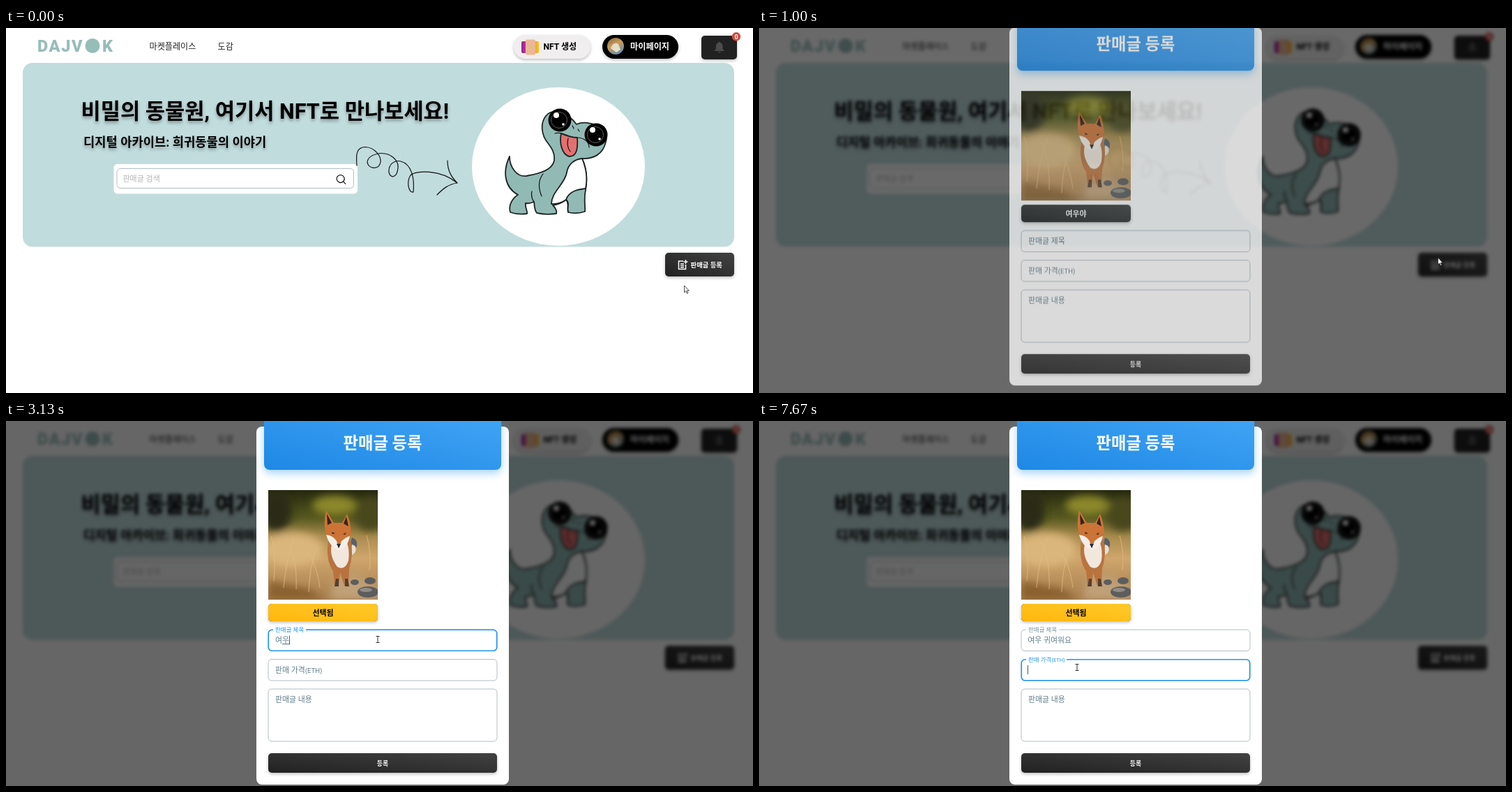
Write an HTML page that moves like this. It is 1071 px wide and 523 px high and loops after 8 s.

```html
<!DOCTYPE html>
<html lang="ko">
<head>
<meta charset="utf-8">
<title>판매글 등록</title>
<style>
html, body { margin: 0; width: 100%; height: 100%; overflow: hidden; background: #fff; }
svg, .overlay { position: absolute; left: 0; top: 0; width: 1071px; height: 523px; }
text { font-family: Roboto, "Noto Sans CJK KR", "Noto Sans CJK", sans-serif; white-space: pre; }
.bold { font-weight: 700; }
.mid { text-anchor: middle; }
.heading { font-weight: 700; filter: drop-shadow(0 3px 2px rgba(0,0,0,.32)); }
.raised { filter: drop-shadow(0 2px 2px rgba(0,0,0,.25)); }
.line { fill: none; stroke: #111; stroke-width: 1.2; stroke-linecap: round; stroke-linejoin: round; }
.ink { stroke: #1c2423; stroke-width: 1.8; stroke-linejoin: round; }
.field { fill: #fff; stroke: #b0bec5; stroke-width: 1; }
.body { font-size: 10.9px; fill: #607d8b; }

.overlay, .dialog, .cursor, .cursor g, .ripple, .picked, .ring, .gap, .label {
  animation: 8s linear infinite;
}
.overlay { background: rgba(0,0,0,.6); backdrop-filter: blur(2.9px); animation-name: fade; }
.dialog { animation-name: drop; }
.ripple { fill: #fff; animation-name: ripple; }
.picked { animation-name: pick; }
.ring { fill: none; stroke: #2196f3; stroke-width: 1.6; }
.gap { fill: #fff; }
.ring.a { animation-name: ring-a; }
.ring.b { animation-name: ring-b; }
.gap.a { animation-name: gap-a; }
.gap.b { animation-name: ring-b; }
.label.a { animation-name: label-a; }
.label.b { animation-name: label-b; }
.cursor { width: 1px; height: 1px; overflow: visible; animation-name: move; }
.cursor .arrow { animation-name: arrow; animation-timing-function: step-end; }
.cursor .beam { animation-name: beam; animation-timing-function: step-end; }

@keyframes fade {
  0%, 10.25% { opacity: 0; animation-timing-function: ease-in-out; }
  12.75%, 100% { opacity: 1; }
}
@keyframes drop {
  0%, 10.375% { opacity: 0; transform: translateY(-36px); animation-timing-function: ease-in-out; }
  13.625%, 100% { opacity: 1; transform: none; }
}
@keyframes ripple {
  0%, 9% { r: 0; opacity: .3; }
  13%, 100% { r: 95px; opacity: 0; }
}
@keyframes pick { 0%, 22.4% { opacity: 0; } 22.5%, 100% { opacity: 1; } }
@keyframes ring-a { 0%, 26.9% { opacity: 0; } 28.9%, 93.8% { opacity: 1; } 95.6%, 100% { opacity: 0; } }
@keyframes ring-b { 0%, 93.8% { opacity: 0; } 95.6%, 100% { opacity: 1; } }
@keyframes gap-a { 0%, 26.9% { opacity: 0; } 28.9%, 100% { opacity: 1; } }
@keyframes label-a {
  0%, 26.9% { transform: translate(386px, 314px); fill: #607d8b; animation-timing-function: ease-out; }
  28.9%, 93.8% { transform: translate(386px, 298.8px) scale(.78); fill: #2196f3; }
  95.6%, 100% { transform: translate(386px, 298.8px) scale(.78); fill: #78909c; }
}
@keyframes label-b {
  0%, 93.8% { transform: translate(386px, 356.5px); fill: #607d8b; animation-timing-function: ease-out; }
  95.6%, 100% { transform: translate(386px, 341.5px) scale(.78); fill: #2196f3; }
}
@keyframes move {
  0%, 5% { transform: translate(972px, 369px); }
  9%, 13.2% { transform: translate(973px, 329px); }
  15% { transform: translate(838px, 205px); }
  15.9% { transform: translate(735px, 132px); }
  16.7% { transform: translate(650px, 105px); }
  17.5% { transform: translate(590px, 150px); }
  18.4% { transform: translate(550px, 225px); }
  19.1% { transform: translate(532px, 272px); }
  20.5%, 24.4% { transform: translate(508px, 270px); }
  25.9%, 87.2% { transform: translate(533px, 313px); }
  93.4%, 100% { transform: translate(456px, 353px); }
}
@keyframes arrow { 0% { opacity: 1; } 25.5% { opacity: 0; } 89.9% { opacity: 1; } 91.6%, 100% { opacity: 0; } }
@keyframes beam { 0% { opacity: 0; } 25.5% { opacity: 1; } 89.9% { opacity: 0; } 91.6%, 100% { opacity: 1; } }
</style>
</head>
<body>

<svg class="page" viewBox="0 0 1071 523">
  <defs>
    <linearGradient id="dark" x1="0" y1="1" x2="1" y2="0"><stop stop-color="#212121"/><stop offset="1" stop-color="#424242"/></linearGradient>
    <linearGradient id="blue" x1="0" y1="1" x2="1" y2="0"><stop stop-color="#1e88e5"/><stop offset="1" stop-color="#42a5f5"/></linearGradient>
    <linearGradient id="amber" x1="0" y1="1" x2="1" y2="0"><stop stop-color="#ffb70e"/><stop offset="1" stop-color="#ffc928"/></linearGradient>
    <linearGradient id="cards"><stop stop-color="#8a1fa8"/><stop offset=".3" stop-color="#d43a86"/><stop offset=".7" stop-color="#f0913c"/><stop offset="1" stop-color="#f6c81f"/></linearGradient>
    <linearGradient id="avatar" x2=".5" y2="1"><stop stop-color="#7d6a45"/><stop offset=".5" stop-color="#c89a58"/><stop offset="1" stop-color="#6d91a5"/></linearGradient>
    <linearGradient id="meadow" x2="0" y2="1">
      <stop stop-color="#25280f"/><stop offset=".25" stop-color="#56581f"/><stop offset=".42" stop-color="#a98b4d"/>
      <stop offset=".62" stop-color="#cfa66c"/><stop offset="1" stop-color="#a67d4e"/>
    </linearGradient>
    <filter id="soft" x="-50%" y="-50%" width="200%" height="200%"><feGaussianBlur stdDeviation="6"/></filter>
    <filter id="smooth"><feGaussianBlur stdDeviation=".7"/></filter>
    <clipPath id="buttonBox"><rect x="945" y="322" width="99" height="34" rx="5"/></clipPath>
    <clipPath id="photoBox"><rect width="157" height="157"/></clipPath>
  </defs>

  <!-- navigation -->
  <g fill="#97bdb9" font-size="23.5" font-weight="900" letter-spacing="1.6">
    <text x="45" y="34">DAJV</text><circle cx="124" cy="25.5" r="10.5"/><text x="138" y="34">K</text>
  </g>
  <g font-size="12.1" font-weight="500" fill="#212121">
    <text x="205.5" y="31">마켓플레이스</text><text x="303.5" y="31">도감</text>
  </g>
  <rect class="raised" x="728" y="10" width="110" height="34" rx="17" fill="#f0eeee"/>
  <rect x="739" y="19" width="25" height="17" rx="2" fill="url(#cards)"/>
  <rect x="745" y="16.500" width="14" height="22" rx="2" fill="#ecb795"/>
  <text class="bold" x="770.5" y="31" font-size="12.1">NFT 생성</text>
  <rect class="raised" x="855" y="10" width="109" height="34" rx="17"/>
  <circle cx="874" cy="26" r="12" fill="url(#avatar)"/>
  <path d="M867 29q4-10 11-6l3 8-6 4z" fill="#e7dcc6"/>
  <text class="bold" x="895" y="31" font-size="12.2" fill="#fff">마이페이지</text>
  <rect class="raised" x="997" y="11" width="51" height="34" rx="5" fill="#212121"/>
  <path d="M1016 33v-1l2-2v-4q0-4 3.500-5v-1h2.500v1q3.500 1 3.500 5v4l2 2v1zm5 1h4q-2 3-4 0z" fill="#4c4c4c"/>
  <circle cx="1047" cy="12.300" r="6.200" fill="#d24a3e"/>
  <text class="mid bold" x="1047" y="15.500" font-size="9" fill="#fff">0</text>

  <!-- hero -->
  <rect x="24" y="50" width="1020" height="263.500" rx="14" fill="#c1dcdd"/>
  <text class="heading" x="107.5" y="129.5" font-size="30.7">비밀의 동물원, 여기서 NFT로 만나보세요!</text>
  <text class="heading" x="111" y="170" font-size="17.700">디지털 아카이브: 희귀동물의 이야기</text>
  <rect x="154.500" y="195" width="349.500" height="42.500" rx="5" fill="#fff"/>
  <rect class="field" x="159" y="201.500" width="339.500" height="28" rx="5"/>
  <text x="167.5" y="220" font-size="11" fill="#b4b4b4">판매글 검색</text>
  <path class="line" d="M483.500 220a5.500 5.500 0 1 1 .1-.1l3 3.500"/>
  <path class="line" d="M503 197C502 184 501 171 515 170.500C529 171 538 184 537 192C535 203 521 203 518 193C518 184 527 181 537 179.500C552 179 563 190 562 200C561 214 552 217 549 207C548 194 558 189 566 191C581 195 586 214 584 235C577 237 574 220 580 211C588 204 622 202 647 222M633 190C633 204 638 213 647 222C634 224 627 230 618 239"/>
  <ellipse cx="792" cy="198.500" rx="124" ry="113.500" fill="#fff"/>

  <!-- lizard -->
  <path class="ink" fill="#92bab5" d="M722 184C722 200 733 214 746 212C768 208 783 203 786 190C787 179 783 173 777 165C767 153 766 136 774 126C785 113 806 122 818 138C836 130 866 144 860 163C856 181 842 188 826 187C832 200 834 215 831 232C828 246 831 256 830 263Q818 267 806 264C804 258 808 251 803 246Q794 253 784 254C788 258 790 262 789 266Q774 268 761 265C757 260 758 254 757 249Q750 252 745 251C744 258 748 262 747 266Q734 268 723 264C720 254 726 244 734 239C714 228 712 205 722 184Z"/>
  <path class="ink" fill="#fff" d="M826 187C832 202 834 214 831 230C822 231 807 233 803 246Q793 253 782 252C782 235 801 224 804 207C806 195 815 188 826 187Z"/>
  <path class="line" d="M770 209Q760 222 768 241M757 249Q752 242 754 234M806 264C804 255 809 250 803 246M787 151C799 148 806 157 818 157C830 157 836 164 836 171M812 140l2 4M820 145l2 3"/>
  <path class="ink" fill="#e37071" d="M796 151C793 164 797 182 808 184C819 184 820 171 819 157Q808 157 796 151Z"/>
  <path class="line" d="M806 158Q803 169 809 177"/>
  <g id="eye">
    <circle cx="794" cy="132" r="16.500"/>
    <circle cx="793" cy="132" r="11.500" fill="none" stroke="#777" stroke-width=".8"/>
    <circle cx="789" cy="125" r="4" fill="#fff"/><circle cx="799" cy="138" r="1.800" fill="#fff"/>
  </g>
  <use href="#eye" x="52" y="21"/>

  <rect class="raised" x="945" y="322" width="99" height="34" rx="5" fill="url(#dark)"/>
  <g fill="none" stroke="#fff" stroke-width="1.500">
    <path d="M971 334h-6.500v11.500h10v-6.500M967 338h5M967 340.500h5M967 343h5M974.500 332v6M971.500 335h6"/>
  </g>
  <text class="bold" x="981.5" y="342.500" font-size="9.400" fill="#fff">판매글 등록</text>
  <g clip-path="url(#buttonBox)"><circle class="ripple" cx="973" cy="333"/></g>
</svg>

<div class="overlay">
  <svg class="dialog" viewBox="0 0 1071 523">
    <rect x="359" y="8" width="362" height="513" rx="8" fill="#fff"/>
    <rect x="370" y="-9" width="340" height="79" rx="8" fill="url(#blue)" style="filter:drop-shadow(0 5px 6px rgba(33,150,243,.4))"/>
    <text class="mid bold" x="540" y="39.500" font-size="23.300" fill="#fff">판매글 등록</text>

    <!-- photo -->
    <g transform="translate(376 99)" clip-path="url(#photoBox)">
      <rect width="157" height="157" fill="url(#meadow)"/>
      <g filter="url(#soft)">
        <ellipse cx="95" cy="22" rx="32" ry="14" fill="#8b8729"/>
        <ellipse cx="12" cy="30" rx="22" ry="30" fill="#292b13"/>
        <ellipse cx="146" cy="35" rx="24" ry="24" fill="#48471c"/>
        <ellipse cx="35" cy="85" rx="45" ry="24" fill="#dab57b"/>
        <path d="M88 157L96 122H126L157 140V157Z" fill="#c0a078"/>
        <path d="M0 130L60 142L80 157H0Z" fill="#89602f"/>
      </g>
      <g stroke="#e2bd82" stroke-width="1.200" opacity=".65" fill="none">
        <path d="M8 130Q12 90 4 66M22 140Q25 100 38 68M40 142Q42 105 30 76M58 146Q59 110 70 80M74 140Q70 108 56 88M145 115Q148 90 141 65"/>
      </g>
      <g filter="url(#smooth)">
        <path d="M120 68Q132 72 124 88L112 96Z" fill="#56616a"/>
        <path d="M120 78Q129 80 124 90L114 98Z" fill="#e9dfd3"/>
        <path d="M86 74Q82 100 93 116L95 137H101L103 118L109 137H115L116 112Q123 92 118 70Z" fill="#b9733f"/>
        <path d="M91 78Q87 94 99 110Q110 116 115 101Q117 86 113 76Z" fill="#f1e7dc"/>
        <path d="M83 29Q79 46 82 60Q90 78 101 84Q112 80 119 62Q118 45 113 34L106 47H94Z" fill="#cc7437"/>
        <path d="M84 34L85 50L91 47ZM112 38L115 52L108 48Z" fill="#39231b"/>
        <path d="M83 64Q93 65 98 73L101 84L105 73Q112 67 117 66Q113 84 102 86Q88 82 83 64Z" fill="#f4eee8"/>
        <path d="M91 60l5 2-4 1zM107 63l5-2-2 3zM98 77h6l-3 6z" fill="#262b36"/>
        <path d="M97 127h4v11h-6zM110 127h4l2 11h-6z" fill="#55402f"/>
        <g fill="#5d5d5e"><ellipse cx="143" cy="146" rx="15" ry="8"/><ellipse cx="124" cy="132" rx="6" ry="4"/><ellipse cx="146" cy="130" rx="8" ry="5"/></g>
        <ellipse cx="140" cy="143" rx="9" ry="3" fill="#918c85"/>
      </g>
    </g>

    <rect class="raised" x="376" y="262" width="157" height="25" rx="5" fill="url(#dark)"/>
    <text class="mid bold" x="454.500" y="278.500" font-size="10.900" fill="#fff">여우야</text>
    <g class="picked">
      <rect x="376" y="262" width="157" height="25" rx="5" fill="url(#amber)"/>
      <text class="mid bold" x="454.500" y="278.500" font-size="10.900">선택됨</text>
    </g>

    <!-- form -->
    <rect class="field" x="376" y="299" width="328" height="30.500" rx="5"/>
    <rect class="ring a" x="376.300" y="299.300" width="327.400" height="30" rx="5"/>
    <rect class="gap a" x="383" y="297" width="47" height="4"/>
    <g class="label a"><text y="4" font-size="10.900">판매글 제목</text></g>
    <text class="body" id="typed" x="386" y="318"><tspan></tspan><tspan text-decoration="underline"></tspan></text>

    <rect class="field" x="376" y="341.500" width="328" height="30.500" rx="5"/>
    <rect class="ring b" x="376.300" y="341.800" width="327.400" height="30" rx="5"/>
    <rect class="gap b" x="383" y="339.500" width="58" height="4"/>
    <g class="label b"><text y="4" font-size="10.900">판매 가격<tspan font-size="9.500">(ETH)</tspan></text></g>
    <path id="caret" d="M0-6.500V6.500" stroke="#455a64"/>

    <rect class="field" x="376" y="384" width="328" height="75" rx="5"/>
    <text class="body" x="386" y="403">판매글 내용</text>
    <rect class="raised" x="376" y="476" width="328" height="28" rx="5" fill="url(#dark)"/>
    <text class="mid bold" x="540" y="493.500" font-size="8.900" fill="#fff">등록</text>
  </svg>
</div>

<svg class="cursor">
  <g class="arrow"><path d="M.5 0V10L2.800 7.900L4.400 11.400L5.900 10.700L4.300 7.400H7.300Z" fill="#fff" stroke="#222" stroke-width=".8"/></g>
  <g class="beam"><path d="M-2.500-4.500H2.500M0-4.500V4.500M-2.500 4.500H2.500" stroke="#333" fill="none"/></g>
</svg>

<script>
const LOOP = 8000;
// time, settled text, syllable being composed
const keys = [
  [0, "", ""], [2600, "", "ㅇ"], [2930, "", "여"], [3000, "여", "ㅇ"], [3130, "여", "우"],
  [3270, "여우 ", ""], [3470, "여우 ", "귀"], [3530, "여우 귀", "ㅇ"], [3670, "여우 귀", "여"],
  [3730, "여우 귀여", "워"], [3870, "여우 귀여워", "ㅇ"], [4070, "여우 귀여워", "오"],
  [4270, "여우 귀여워", "요"], [4600, "여우 귀여워", ""], [4730, "여우 귀여", ""],
  [4930, "여우 귀", ""], [5070, "여우 ", "구"], [5130, "여우 ", ""], [5400, "여우 ", "ㄱ"],
  [5530, "여우 ", "귀"], [5670, "여우 귀", "ㅇ"], [5730, "여우 귀", "여"], [5800, "여우 귀여", "ㅇ"],
  [5870, "여우 귀여", "워"], [6000, "여우 귀여워", "요"], [6470, "여우 귀여워요", ""]
];
const typed = document.getElementById("typed");
const caret = document.getElementById("caret");
const [settled, composing] = typed.children;
const between = (t, from, to) => t >= from && t < to;

function render(t) {
  const [, done, open] = keys.findLast(([time]) => time <= t);
  settled.textContent = done;
  composing.textContent = open;
  typed.setAttribute("x", t < 6470 ? 386 : 385.3);

  const inPrice = t >= 7520;
  const x = inPrice ? 385.5 : 386 + typed.getComputedTextLength();
  caret.setAttribute("transform", `translate(${Math.floor(x) + .5} ${inPrice ? 356.5 : 314})`);
  const shown = inPrice || between(t, 2190, 6470) || between(t, 7000, 7500);
  caret.setAttribute("opacity", shown ? 1 : 0);
}

function tick() {
  render(performance.now() % LOOP);
  requestAnimationFrame(tick);
}
tick();
</script>
</body>
</html>
```
